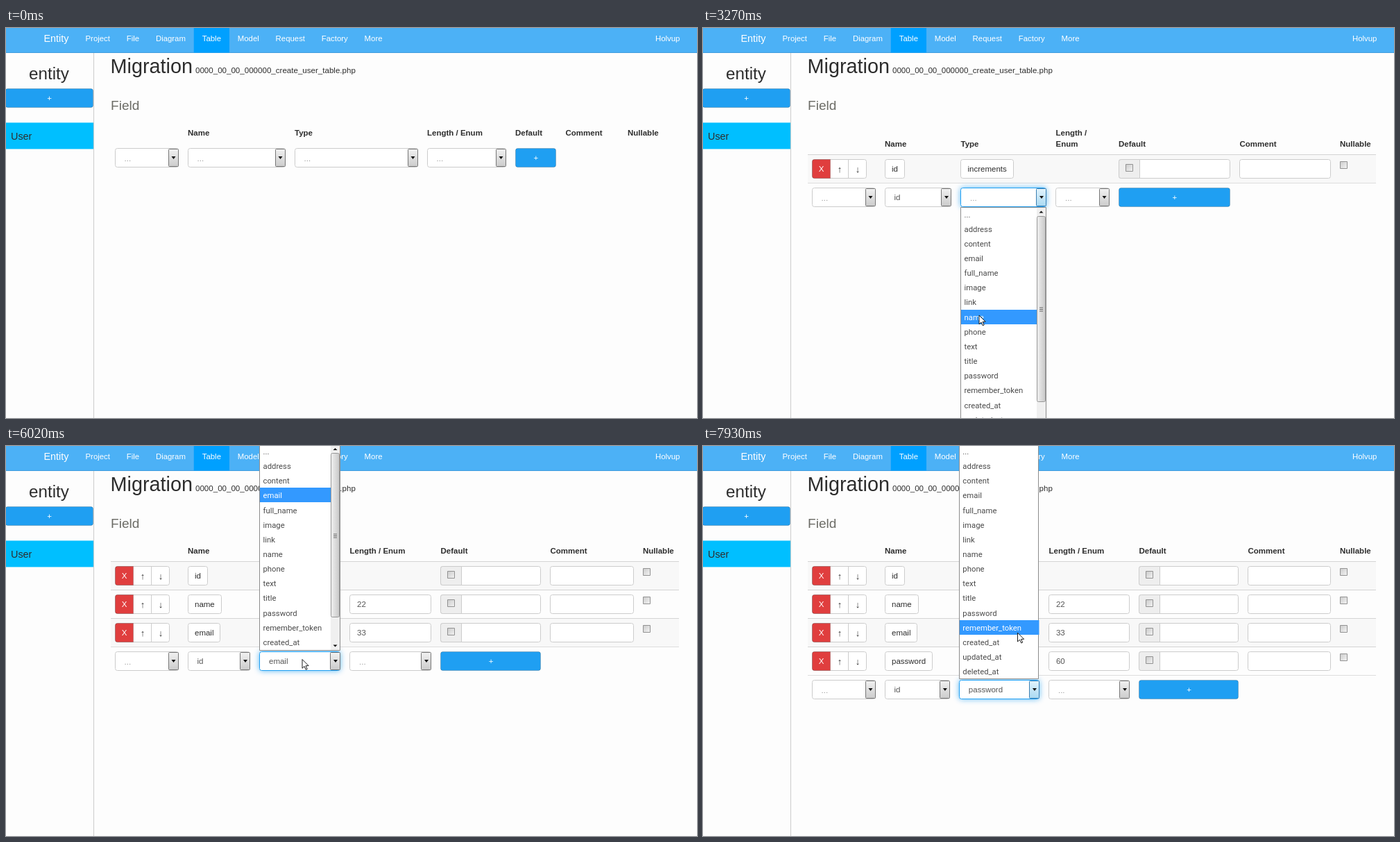
These frames come from a looping animation (996 by 562 pixels, 8 s). An HTML page with a canvas:

```html
<!DOCTYPE html>
<html lang="en">
<head>
<meta charset="utf-8">
<title>Migration</title>
<style>
html, body { margin: 0; width: 996px; height: 562px; overflow: hidden; background: #fdfdfd; }
canvas { display: block; }
</style>
</head>
<body>
<canvas id="stage" width="996" height="562"></canvas>
<script>
const c = document.getElementById('stage').getContext('2d');
const LOOP = 8000, FLASH = 70, LAG = 100;
const ROW = 41, OPT = 21.15, GAP = 13, BOX = 28, WINDOW = 574;
const SANS = '"Liberation Sans", Arial, sans-serif';
const BASE = '11.5px ' + SANS, BOLD = 'bold ' + BASE, NAV = '11.4px ' + SANS;
const BLUE = '#1f9ff2', LINE = '#ccc', INK = '#2d2d2d', EDGE = 'rgba(0,0,0,.18)';

const HEADS = ['Name', 'Type', 'Length / Enum', 'Default', 'Comment', 'Nullable'];
const FIELDS = [['id', 'increments'], ['name', 'string', '22'], ['email', 'string', '33'], ['password', 'string', '60']];
const LISTS = {
  name: '... id age sex sort status type category_id parent_id post_id tag_id user_id'.split(' '),
  type: ('... address content email full_name image link name phone text title password ' +
    'remember_token created_at updated_at deleted_at').split(' ')
};

// Pointer script: goal, leave, arrive, click, x (the "+" goals are clicked on arrival, at their centre)
const STEPS = [
  ['name', 70, 620, 690, 392], ['id', 930, 1160, 1480, 301.5], ['+', 1580, 1740],
  ['type', 1840, 2100, 2250, 474.5], ['name', 2690, 3270, 3500, 398], ['+', 3600, 3690],
  ['type', 3790, 4050, 4220, 446.5], ['email', 4520, 5000, 5150, 419.5], ['+', 5250, 5310],
  ['type', 5410, 5470, 5790, 427], ['password', 6100, 6660, 6825, 436.5], ['+', 6925, 7110],
  ['type', 7210, 7420, 7440, 476], ['remember_token', 7540, 7920, LOOP, 453.5]
];

// Left edges of the six columns; a long name squeezes the rest to the right
function columns(n) {
  if (n === 0) return [262, 416, 607, 734, 806.5, 896];
  if (n === 1) return [262, 371.5, 508.5, 599, 773.5, 918];
  const wide = [262, 365.5, 495.5, 626.5, 784.5, 918];
  return n < 4 ? wide : wide.map((x, i) => i ? x + (918 - x) * .007 : x);
}

function layout(n) {
  const first = n === 1 ? 182 : 166;
  return { cols: columns(n), first, top: first + n * ROW + 7 };
}

function listSpan({ n, open }) {
  const { top } = layout(n), from = top + BOX;
  if (n > 2) return [-2.6, top - 1];
  return [from, Math.min(WINDOW, from + LISTS[open].length * OPT)];
}

const optionTop = (from, i) => from - .45 + i * OPT;

function goalPoint([goal, , , , x], s) {
  const { cols, top } = layout(s.n);
  if (goal === '+') return [(cols[3] + cols[4] - GAP) / 2, top + 13];
  if (!s.open) return [x, top + 11.5];
  const [from] = listSpan(s);
  return [x, optionTop(from, LISTS[s.open].indexOf(goal) + (from < 0 ? .87 : .4))];
}

function applyClick(goal, s) {
  if (goal === '+') s.n++;
  else if (s.open) {
    s[s.open] = goal;
    s.open = null;
    s.hover = false;
  } else {
    const next = layout(s.n).cols[goal === 'name' ? 1 : 2];
    s.open = s.focus = goal;
    s.hover = s.x > next - GAP - 23;
  }
}

function stateAt(t) {
  const s = { n: 0, name: '...', type: '...', x: 893, y: 533 };
  for (const step of STEPS) {
    const [goal, leave, arrive, click = arrive] = step;
    if (t < leave) break;
    const [gx, gy] = goalPoint(step, s);
    const u = Math.min(1, (t - leave) / (arrive - leave)), k = u * u * (3 - 2 * u);
    s.x += (gx - s.x) * k;
    s.y += (gy - s.y) * k;
    s.flash = t >= click && t < click + FLASH;
    if (t < click + LAG) break;
    applyClick(goal, s);
  }
  return s;
}

function text(s, x, y, font = BASE, color = INK, align = 'left') {
  c.font = font;
  c.fillStyle = color;
  c.textAlign = align;
  c.fillText(s, x, y);
}

function rect(x, y, w, h, color) {
  c.fillStyle = color;
  c.fillRect(x, y, w, h);
}

function box(x, y, w, h, fill = '#fff', stroke = LINE, r = 3, glow = 0) {
  const l = Math.floor(x), t = Math.floor(y);
  c.beginPath();
  c.roundRect(l + .5, t + .5, Math.floor(x + w) - l - 1, Math.floor(y + h) - t - 1, r);
  c.shadowColor = 'rgba(31,159,242,.8)';
  c.shadowBlur = glow;
  c.fillStyle = fill;
  c.fill();
  c.shadowBlur = 0;
  c.strokeStyle = stroke;
  c.lineWidth = 1;
  c.stroke();
}

function shade(x0, y0, x1, y1, from, to) {
  const g = c.createLinearGradient(x0, y0, x1, y1);
  g.addColorStop(0, from);
  g.addColorStop(1, to);
  return g;
}

function triangle(x, y, h) {
  c.fillStyle = '#111';
  c.beginPath();
  c.moveTo(x - 3, y - h / 2);
  c.lineTo(x + 3, y - h / 2);
  c.lineTo(x, y + h / 2);
  c.fill();
}

function plus(x, y, w) {
  box(x, y, w, BOX, BLUE, EDGE);
  text('+', x + w / 2, y + 18, BASE, '#fff', 'center');
}

function select(x, y, w, value, focus, hover) {
  const empty = value === '...';
  box(x, y, w, BOX, '#fff', focus ? BLUE : LINE, 3, focus ? 8 : 0);
  text(value, x + 13.5, y + (empty ? 18.5 : 18), BASE, empty ? '#999' : '#555');
  const bx = x + w - 15;
  const [light, dark, edge] = hover ? ['#e6f5fd', '#a9d9f2', '#3c7fb1'] : ['#f3f3f3', '#cbcbcb', '#777'];
  box(bx, y + 1, 15, 26, shade(0, y, 0, y + 27, light, dark), edge, 1);
  triangle(bx + 7.5, y + 14, 4);
}

function checkbox(x, y) {
  box(x, y, 11, 11, shade(x, y, x + 11, y + 11, '#c9c9c9', '#f6f6f6'), '#929292', 0);
}

function drawPage() {
  rect(0, 0, 996, 562, '#fdfdfd');
  rect(0, 0, 996, 36, '#4cb1f6');
  rect(0, 35, 996, 1, '#419ddd');
  text('Entity', 54.5, 20, '14.4px ' + SANS, '#fff');
  let x = 114.5;
  c.font = NAV;
  for (const s of ['Project', 'File', 'Diagram', 'Table', 'Model', 'Request', 'Factory', 'More']) {
    const w = c.measureText(s).width;
    if (s === 'Table') rect(x - 12, 0, w + 24, 35.5, '#00a0ff');
    text(s, x, 19, NAV, '#fff');
    x += w + 23.8;
  }
  text('Holvup', 936, 19, NAV, '#fff');
  rect(126, 36, 1, 526, LINE);
  text('entity', 62, 74, '24.2px ' + SANS, INK, 'center');
  plus(-1, 87, 127);
  rect(0, 136.4, 126, 38, '#00bfff');
  text('User', 7, 160.5, '14.4px ' + SANS);
  text('Migration', 150.5, 65, '28.8px ' + SANS);
  text('0000_00_00_000000_create_user_table.php', 273, 65, '11.57px ' + SANS);
  text('Field', 151, 118, '19.1px ' + SANS, '#6c6c66');
}

function drawHeads({ cols, first }, n) {
  HEADS.forEach((s, i) => {
    if (n === 1 && i === 2) {
      text('Length /', cols[i], 155, BOLD);
      s = 'Enum';
    }
    text(s, cols[i], first - 11, BOLD);
  });
}

function drawField([name, type, len], [nx, tx, lx, dx, cx, ux], y, odd) {
  rect(151, y, 819, ROW, odd ? '#f8f8f8' : '#fdfdfd');
  rect(151, y, 819, 1, '#d4d4d4');
  rect(151, y + ROW, 819, 1, '#ddd');
  const top = y + 7, base = y + 25;
  box(157, top, 79, BOX);
  rect(209, top, 1, BOX, LINE);
  box(157, top, 27, BOX, '#e03e3e', EDGE, [3, 0, 0, 3]);
  text('X', 170.5, base, BASE, '#fff', 'center');
  text('↑', 197, base + 1, '13px ' + SANS, INK, 'center');
  text('↓', 223, base + 1, '13px ' + SANS, INK, 'center');
  for (const [s, x] of [[name, nx], [type, tx]]) {
    c.font = BASE;
    box(x, top, c.measureText(s).width + 20.5, BOX);
    text(s, x + 10, base);
  }
  if (len) {
    box(lx, top, dx - lx - GAP, BOX);
    text(len, lx + 10.5, base, BASE, '#555');
  }
  box(dx, top, cx - dx - GAP, BOX);
  box(dx, top, 31, BOX, '#eee', LINE, [3, 0, 0, 3]);
  checkbox(dx + 10, y + 14);
  box(cx, top, ux - cx - GAP, BOX);
  checkbox(ux, y + 10);
}

function drawScrollbar(x, top, bottom, full) {
  const view = bottom - top, y = top + 13, h = (view - 28) * view / full;
  rect(x, top + 1, 13, view - 2, '#f0f0f0');
  triangle(x + 6.5, top + 7, -3);
  triangle(x + 6.5, bottom - 7, 3);
  box(x, y, 13, h, shade(x, 0, x + 13, 0, '#f2f2f2', '#c6c6c6'), '#979797', 2);
  for (let i = -1; i < 2; i++) rect(x + 4, Math.round(y + h / 2) + i * 2.5, 5, 1, '#666');
}

function drawList(s, x, w) {
  const items = LISTS[s.open], [top, bottom] = listSpan(s), full = items.length * OPT;
  const scrolls = bottom - top < full - 1;
  const inside = s.y > top && s.y < bottom;
  const mark = inside ? Math.floor((s.y - optionTop(top, 0)) / OPT) : items.indexOf(s[s.open], 1);
  box(x, top, w, bottom - top, '#fff', '#8c8c8c', 0);
  items.forEach((item, i) => {
    const y = optionTop(top, i), on = i === mark;
    if (y + OPT > bottom + 2) return;
    if (on) rect(x + .5, Math.round(y), w - (scrolls ? 14 : 1), 21, '#3399ff');
    text(item, x + 5, y + 15, '11.3px Roboto, "Noto Sans", sans-serif', on ? '#fff' : '#4a4a4a');
  });
  if (scrolls) drawScrollbar(x + w - 14, top, bottom, full);
}

function drawCursor({ x, y, flash }) {
  if (flash) {
    c.fillStyle = 'rgba(222,220,40,.68)';
    c.beginPath();
    c.arc(x, y, 9.5, 0, 7);
    c.fill();
  }
  c.save();
  c.translate(x, y);
  c.scale(.8, .8);
  const arrow = new Path2D('M0 0V16L3.8 12.5L6.6 18.5L9 17.4L6.3 11.6L11.4 11.4Z');
  c.fillStyle = '#fff';
  c.fill(arrow);
  c.strokeStyle = '#111';
  c.lineWidth = 1.2;
  c.stroke(arrow);
  c.restore();
}

function draw(t) {
  const s = stateAt(t), grid = layout(s.n), { cols, first, top } = grid;
  const [nx, tx, lx, dx, cx] = cols;
  drawPage();
  drawHeads(grid, s.n);
  FIELDS.slice(0, s.n).forEach((f, i) => drawField(f, cols, first + i * ROW, i % 2 === 0));
  select(157, top, 92, '...');
  select(lx, top, dx - lx - GAP, '...');
  plus(dx, top, cx - dx - GAP);
  for (const [key, x, next] of [['name', nx, tx], ['type', tx, lx]]) {
    const w = next - x - GAP;
    select(x, top, w, s[key], s.focus === key, s.open === key && s.hover);
    if (s.open === key) drawList(s, x, w - .5);
  }
  if (t >= STEPS[0][1]) drawCursor(s);
}

function tick() {
  draw(performance.now() % LOOP);
  requestAnimationFrame(tick);
}
tick();
</script>
</body>
</html>
```
